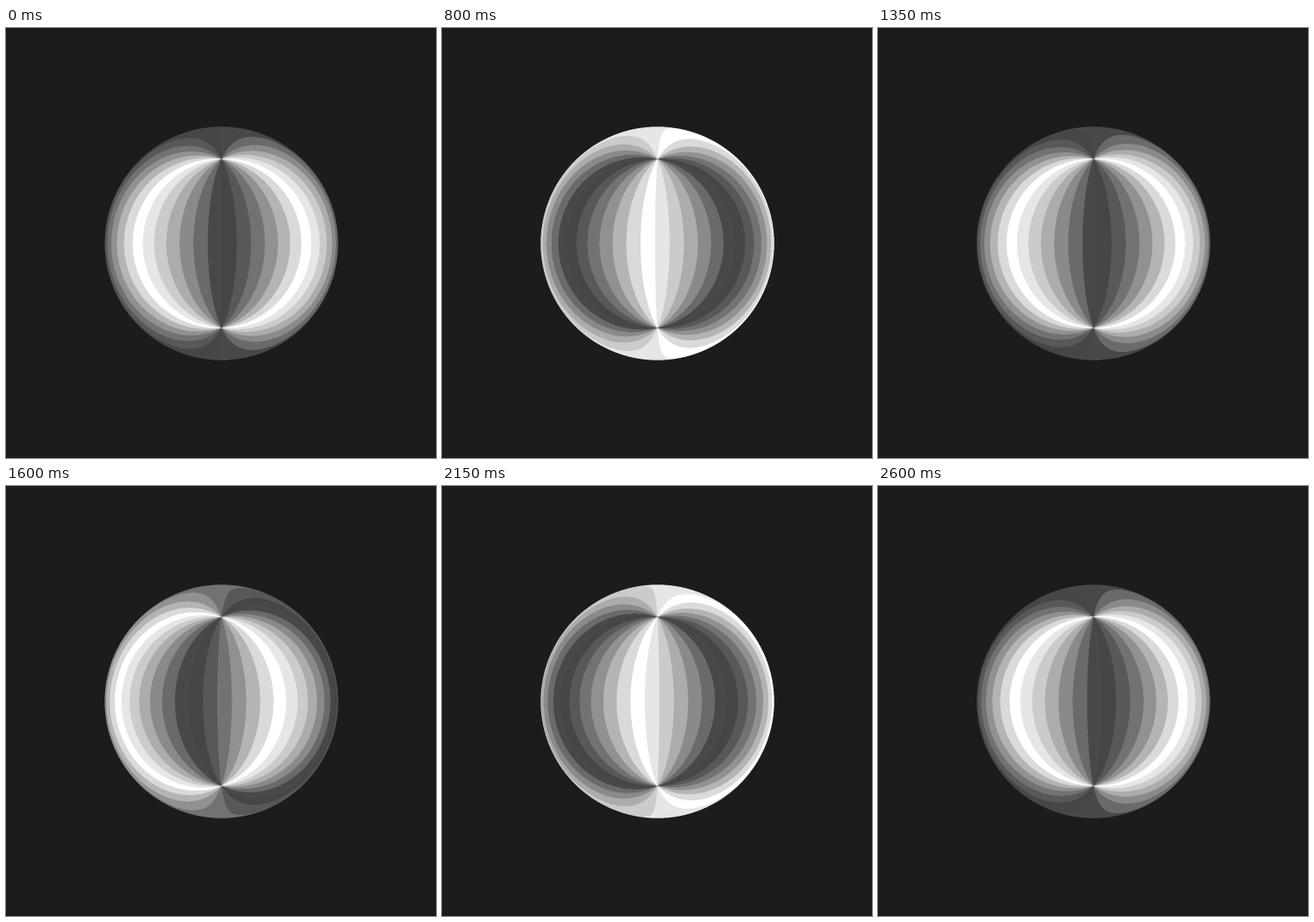
Write an HTML page with a canvas that moves like this. It is 498 by 498 pixels and loops after 2650 ms.

```html
<!DOCTYPE html>
<html lang="en">
<head>
<meta charset="utf-8">
<title>Mirror ball</title>
<style>
  html, body { margin: 0; width: 100%; height: 100%; overflow: hidden; background: #1c1c1c; }
  canvas { display: block; width: 498px; height: 498px; }
</style>
</head>
<body>
<canvas id="stage" width="498" height="498"></canvas>
<script>
// A mirror ball reflecting a striped surround that turns around the vertical axis.
const SIZE = 498, CENTER = 249.5, RADIUS = 135.2, CAMERA = 15;
const LOOP = 2650, STEP = 50, SUB = 3, BACK = 28;
const SHADES = [255, 230, 203, 172, 138, 106, 72, 70, 88, 114, 145, 180, 218];
const BAND = 360 / (SHADES.length * 2);

const ctx = document.getElementById('stage').getContext('2d');
const left = Math.floor(CENTER - RADIUS) - 1;
const side = Math.ceil(RADIUS * 2) + 4;
const image = ctx.createImageData(side, side);
const samples = new Float32Array(side * side * SUB * SUB);

// Longitude in bands of the reflected ray, or -1 beside the ball.
function reflect(px, py) {
  const x = (px - CENTER) / RADIUS, y = (py - CENTER) / RADIUS;
  if (x * x + y * y >= 1) return -1;
  const c = CAMERA * CAMERA - 1, t = 1 / Math.sqrt(c);
  const dx = x * t, dy = y * t, a = dx * dx + dy * dy + 1;
  const s = (CAMERA - Math.sqrt(Math.max(0, CAMERA * CAMERA - a * c))) / a;
  const nx = s * dx, ny = s * dy, nz = CAMERA - s;
  const k = 2 * (dx * nx + dy * ny - nz);
  const angle = Math.atan2(dx - k * nx, -1 - k * nz) * 180 / Math.PI;
  return (angle + 360) / BAND;
}

let n = 0;
for (let y = 0; y < side; y++) {
  for (let x = 0; x < side; x++) {
    for (let i = 0; i < SUB * SUB; i++) {
      samples[n++] = reflect(left + x + (i % SUB + 0.5) / SUB,
                             left + y + (Math.floor(i / SUB) + 0.5) / SUB);
    }
  }
}

// Longitude of the white stripe; the turn starts a little slower.
function whiteAt(ms) {
  const slow = Math.min(ms, 800), fast = ms - slow;
  return 90.8 - slow * 0.125 - fast * 260 / 1850;
}

function draw(ms) {
  const shift = (720 - whiteAt(ms)) / BAND + 0.5;
  const data = image.data, per = SUB * SUB;
  for (let p = 0, i = 0; p < side * side; p++) {
    let sum = 0;
    for (let j = 0; j < per; j++) {
      const v = samples[i++];
      sum += v < 0 ? BACK : SHADES[Math.floor(v + shift) % SHADES.length];
    }
    data[p * 4] = data[p * 4 + 1] = data[p * 4 + 2] = sum / per;
    data[p * 4 + 3] = 255;
  }
  ctx.putImageData(image, left, left);
}

ctx.fillStyle = '#1c1c1c';
ctx.fillRect(0, 0, SIZE, SIZE);

const start = performance.now();
let shown = -1;
function tick() {
  const ms = (performance.now() - start) % LOOP;
  const now = Math.floor(ms / STEP) * STEP;
  if (now !== shown) draw(shown = now);
  requestAnimationFrame(tick);
}
tick();
</script>
</body>
</html>
```
